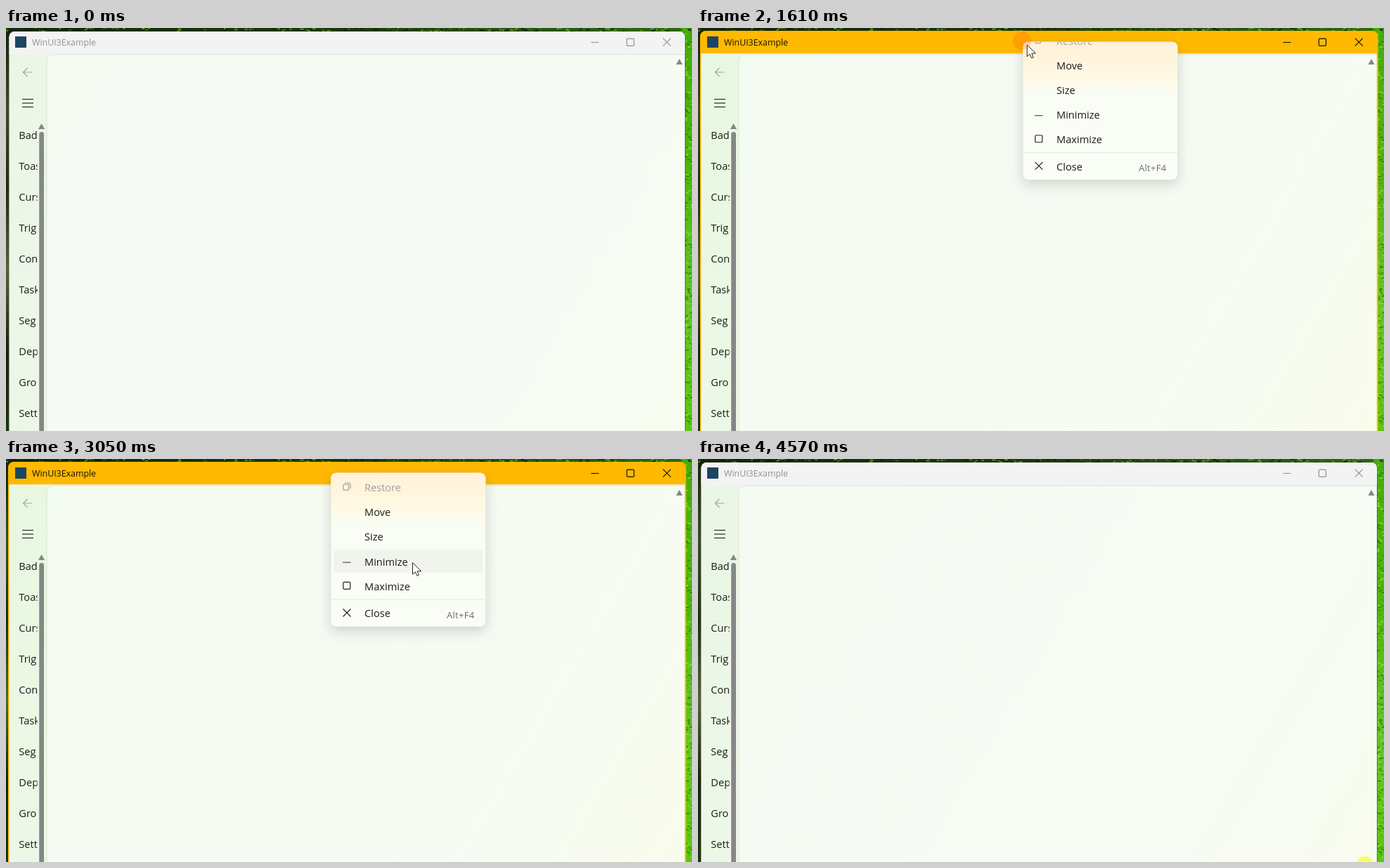
An HTML page with a canvas that plays this animation: 976 by 574 pixels, repeating every 4600 ms.

```html
<!DOCTYPE html>
<html lang="en">
<head>
<meta charset="utf-8">
<title>Window menu</title>
<style>
html, body { margin: 0; width: 976px; height: 574px; overflow: hidden; background: #16240b; }
canvas { display: block; }
</style>
</head>
<body>
<canvas id="stage" width="976" height="574"></canvas>
<script>
const W = 976, H = 574, LOOP = 4600;
const OPEN = 1510, CLOSE = 4530;
const g = document.getElementById('stage').getContext('2d');
const FONT = '"Open Sans", "Noto Sans", sans-serif';
const NAV = ['Bad', 'Toas', 'Curs', 'Trig', 'Con', 'Task', 'Seg', 'Dep', 'Gro', 'Sett'];
const MENU = ['Restore', 'Move', 'Size', 'Minimize', 'Maximize', 'Close'];
const rowY = i => 40.8 + 35.15 * i + (i === 5 ? 3.5 : 0);

// resting points of the pointer: time, x, y
const STOPS = [
  [0, 820, 585], [520, 485, 42], [790, 463, 21], [1560, 461, 18], [1910, 578, 116],
  [2250, 836, 437], [2380, 836, 437], [2580, 587, 186], [2990, 578, 135],
  [3260, 578, 229], [3510, 578, 161], [3690, 610, 68], [4010, 945, 317],
  [4260, 963, 558], [4340, 960, 600]
];

const clamp = v => Math.max(0, Math.min(1, v));
const ramp = (t, a, b) => clamp((t - a) / (b - a));
const smooth = k => k * k * (3 - 2 * k);

function pointerAt(t) {
  let [, x, y] = STOPS[0];
  for (let i = 1; i < STOPS.length; i++) {
    const [end, nx, ny] = STOPS[i], k = smooth(ramp(t, STOPS[i - 1][0], end));
    x += (nx - x) * k;
    y += (ny - y) * k;
  }
  return [x, y];
}

// the highlight trails the pointer slightly
function litRow(t) {
  const [x, y] = pointerAt(t - 35);
  if (t < OPEN + 450 || x < 466 || x > 679) return -1;
  return MENU.findIndex((_, i) => i && Math.abs(y - rowY(i)) < 15.5);
}

function text(s, x, y, size, color) {
  g.font = size + 'px ' + FONT;
  g.fillStyle = color;
  g.fillText(s, x, y);
}

function lines(color, width, ...paths) {
  g.strokeStyle = color;
  g.lineWidth = width;
  g.beginPath();
  for (const p of paths)
    for (let i = 0; i < p.length; i += 2) i ? g.lineTo(p[i], p[i + 1]) : g.moveTo(p[0], p[1]);
  g.stroke();
}

function rect(color, x, y, w, h) {
  g.fillStyle = color;
  g.fillRect(x, y, w, h);
}

function fillBox(color, x, y, w, h, r) {
  g.fillStyle = color;
  g.beginPath();
  g.roundRect(x, y, w, h, r);
  g.fill();
}

function strokeBox(color, width, x, y, w, h, r) {
  g.strokeStyle = color;
  g.lineWidth = width;
  g.beginPath();
  g.roundRect(x, y, w, h, r);
  g.stroke();
}

function cross(color, x, y) {
  const r = 5.5;
  lines(color, 1.2, [x - r, y - r, x + r, y + r], [x + r, y - r, x - r, y + r]);
}

function triangle(x, y) {
  g.fillStyle = '#868686';
  g.beginPath();
  g.moveTo(x - 4.6, y + 4);
  g.lineTo(x, y - 4);
  g.lineTo(x + 4.6, y + 4);
  g.fill();
}

function dot(color, x, y) {
  g.fillStyle = color;
  g.beginPath();
  g.arc(x, y, 13, 0, 7);
  g.fill();
}

function gradient(x1, y1, ...colors) {
  const f = g.createLinearGradient(0, 0, x1, y1);
  colors.forEach((c, i) => f.addColorStop(i / (colors.length - 1), c));
  return f;
}

function wallpaper() {
  let seed = 7;
  const rnd = () => (seed = seed * 16807 % 2147483647) / 2147483647;
  const blades = (count, x, w, h, colors) => {
    for (let i = 0; i < count; i++) {
      const bx = x + rnd() * w, by = rnd() * h;
      lines(colors[i % colors.length], 1.5, [bx, by, bx + 2 + rnd() * 4, by + rnd() * 6 - 3]);
    }
  };
  rect(gradient(W, 0, '#16240b', '#1d350c', '#2c6a0c'), 0, 0, W, 8);
  rect(gradient(0, H, '#15200c', '#3c4a26', '#1c2c10', '#56633a', '#14220b', '#1f3210'), 0, 5, 8, H);
  rect(gradient(0, H, '#45ac0c', '#4cb80c', '#62c42a', '#5ac80c'), 960, 0, 16, H);
  blades(170, 0, W, 5, ['#5aa820', '#2f6a12', '#0d1708']);
  blades(240, 964, 12, H, ['#2a8004', '#7ee034', '#43a808']);
}

function appWindow(active, tint) {
  const ink = active ? '#171006' : '#929292';
  const top = active ? 36.6 : 5;
  const edge = [4.6, top, 961.2, 600, active ? 0 : 8];
  if (active) fillBox('#ffb900', 3, 4, 964.5, 600, 8);
  else fillBox('rgba(70,85,60,.55)', 3.7, 4.5, 963, 600, 8);

  fillBox('#f3f3f3', ...edge);
  g.globalAlpha = tint;
  fillBox(gradient(W, H, '#e8f7e1', '#ebf8e5', '#ecf8e6', '#edf8e6', '#f2f9d8'), ...edge);
  g.globalAlpha = 1;
  if (!active) fillBox('#f3f3f3', 4.6, 5, 961.2, 32.5, [8, 8, 0, 0]);

  fillBox('rgba(255,255,255,.52)', 58, 38, 907.8, 600, [8, 0, 0, 0]);
  strokeBox('rgba(60,80,60,.11)', 1, 58, 37.8, 920, 600, [8, 0, 0, 0]);
  rect(active ? '#ffb900' : 'rgba(60,80,50,.4)', 965.8, 37, active ? 1.5 : .8, H);

  rect('#1d4560', 13, 12, 16, 16);
  text('WinUI3Example', 37, 25, 12.36, ink);
  lines(ink, 1.1, [832.5, 20.5, 843.5, 20.5]);
  strokeBox(ink, 1.2, 883.3, 15.2, 10.2, 10.2, 1.5);
  cross(ink, 940.3, 20.2);
}

function sidebar() {
  lines('#a0a3a0', 1.2, [37.5, 63, 24.5, 63], [30.5, 57, 24.5, 63, 30.5, 69]);
  for (let y = 101.5; y < 115; y += 5.5) lines('#2a2a2a', 1.2, [23, y, 39, y]);
  g.save();
  g.beginPath();
  g.rect(0, 130, 44.6, H);
  g.clip();
  NAV.forEach((s, i) => text(s, 18.3, 158 + 44 * i, 14.6, '#1b1b1b'));
  g.restore();
  fillBox('#868686', 47.2, 148, 6.8, 500, 3.4);
  triangle(50.5, 140);
  triangle(958, 48);
}

function menu(t) {
  if (t < OPEN || t >= CLOSE) return;
  const x = 462, y = 19.5, w = 220.5, full = 219.5;
  const open = ramp(t, OPEN, OPEN + 190), h = full * (1 - (1 - open) ** 3);
  g.save();
  g.globalAlpha = clamp(open * 3);
  g.shadowColor = 'rgba(0,0,0,.16)';
  g.shadowBlur = 17;
  g.shadowOffsetY = 6;
  fillBox('#f9fdf5', x, y, w, h, 8);
  g.shadowColor = 'transparent';
  g.clip();
  rect(gradient(0, 95, '#ffefd0', '#fff2d8', '#fff5de', '#fffae6', '#f9fdf5'), x, y, w, Math.min(h, 75));
  strokeBox('rgba(0,0,0,.08)', 1, x, y, w, h, 8);
  g.translate(0, h - full);

  const lit = litRow(t);
  if (lit > 0) fillBox('rgba(0,0,0,.035)', 466.5, rowY(lit) - 17, 212, 32.5, 4);
  rect('#e2e8df', x, 199.7, w, 1);
  MENU.forEach((s, i) => text(s, 510, rowY(i) + 5.3, 14.6, i ? '#1b1b1b' : '#a3a098'));
  g.letterSpacing = '0.3px';
  text('Alt+F4', 627, 226.7, 13, '#6a6d69');
  g.letterSpacing = '0px';

  strokeBox('#9b978e', 1.1, 479.7, 36.3, 8, 8, 2);
  lines('#9b978e', 1.1, [482, 34.3, 488.5, 34.3, 490, 35.8, 490, 42]);
  lines('#333', 1.1, [479, 147.3, 490.5, 147.3]);
  strokeBox('#222', 1.2, 479.8, 175.3, 10, 10, 1.3);
  cross('#222', 485, 219);
  g.restore();
}

function pointer(x, y) {
  const arrow = new Path2D('M.5 .5V17l3.8-3.4L7 19.3l2.4-1.1L7 12.6l5.6-.2z');
  g.save();
  g.translate(x, y);
  g.lineJoin = 'round';
  g.lineWidth = 1;
  g.fillStyle = '#fff';
  g.strokeStyle = '#222';
  g.fill(arrow);
  g.stroke(arrow);
  g.restore();
}

function draw(t) {
  const active = t >= 980 && t < CLOSE;
  // the window tint drains after focus is lost, across the loop's seam
  const sinceLost = (t - CLOSE + LOOP) % LOOP;
  const tint = active ? ramp(t, 980, 1230) : (1 - ramp(sinceLost, 0, 570)) ** 2;
  wallpaper();
  appWindow(active, tint);
  sidebar();
  menu(t);
  const away = t < 30 || t > 4010 && t < 4260;
  if (!away) pointer(...pointerAt(t));
  if (t >= 1390 && t < 1650) dot(`rgba(255,72,0,${.78 * (1 - ramp(t, OPEN, 1650))})`, 461, 18);
  if (t >= CLOSE) dot('rgba(255,250,0,.55)', 949, 579);
}

function tick() {
  draw(performance.now() % LOOP);
  requestAnimationFrame(tick);
}
tick();
</script>
</body>
</html>
```
